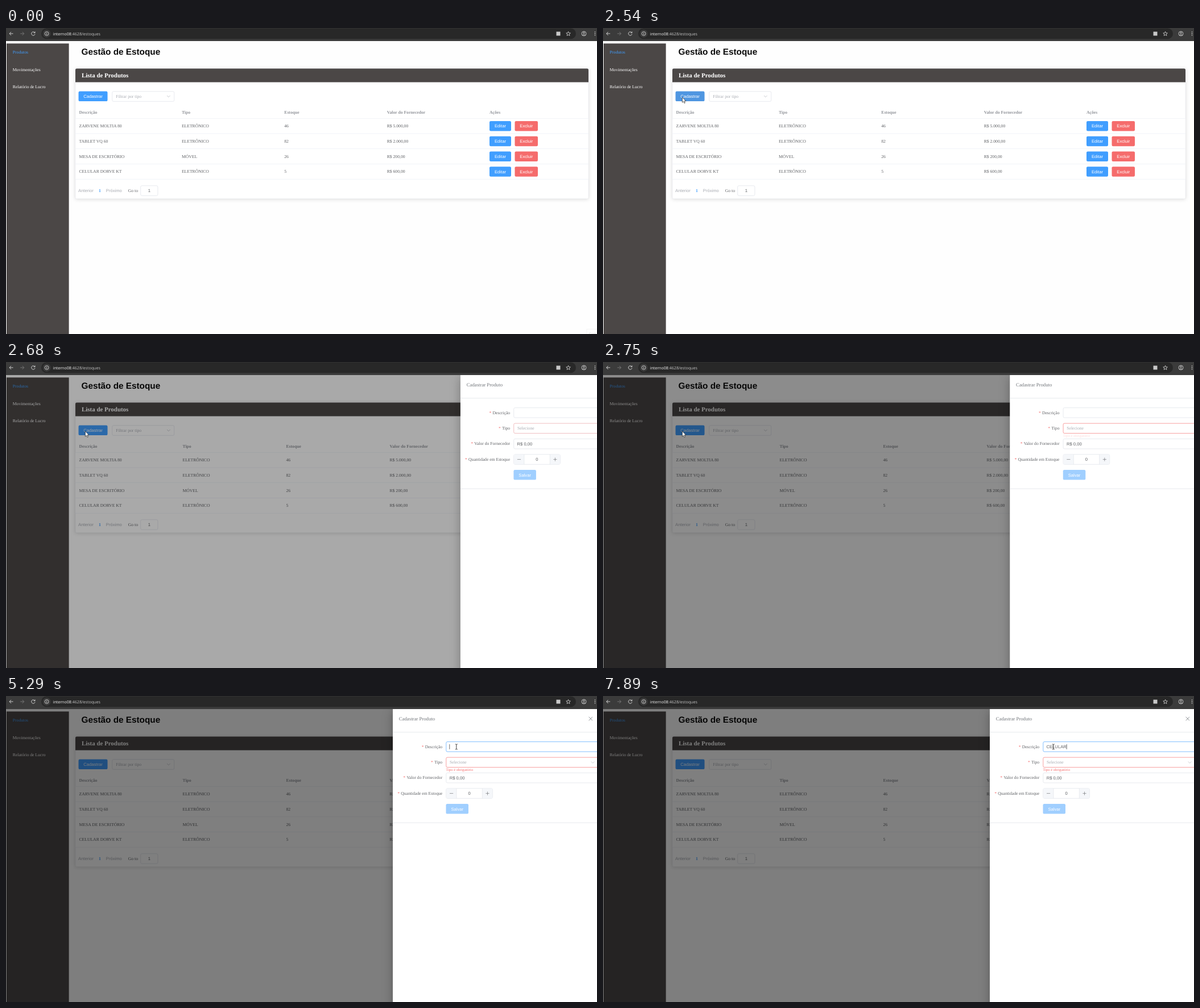
An HTML page for the animation above (8000 ms loop, 1039 by 539 pixels).

```html
<!DOCTYPE html>
<html lang="pt">
<head>
<meta charset="utf-8">
<title>Gestão de Estoque</title>
<style>
  html, body { margin: 0; width: 100%; height: 100%; overflow: hidden; background: #fefefe; }
  svg { display: block; width: 100%; height: 100%; }
  text { font-size: 7.65px; text-rendering: geometricPrecision; white-space: pre; }
  .serif { font-family: "Liberation Serif", "Times New Roman", serif; }
  .sans { font-family: "Liberation Sans", Arial, sans-serif; }
  .url { font-family: "Open Sans", "Noto Sans", sans-serif; font-size: 7.1px; }
  .bold { font-weight: bold; }
  .mid { text-anchor: middle; }
  .end { text-anchor: end; }
  .card { filter: drop-shadow(0 1px 3.3px rgba(0,0,0,.14)); }
  .panel { filter: drop-shadow(0 4px 9px rgba(0,0,0,.28)); }
</style>
</head>
<body>
<svg id="stage" viewBox="0 0 1039 539" preserveAspectRatio="none"></svg>
<script>
const BLUE = '#409eff', RED = '#f56c6c', INK = '#606266', MUTED = '#a8abb2';
const DARK = '#4b4746', BORDER = '#dcdfe6', LINE = '#ebeef5';
const stage = document.getElementById('stage');

function add(parent, tag, attrs = {}, content) {
  const el = document.createElementNS('http://www.w3.org/2000/svg', tag);
  for (const key in attrs) el.setAttribute(key, attrs[key]);
  if (content !== undefined) el.textContent = content;
  parent.append(el);
  return el;
}
const group = parent => add(parent, 'g');
const rect = (p, x, y, width, height, fill, more) => add(p, 'rect', { x, y, width, height, fill, ...more });
const path = (p, d, stroke, width = .6, more) =>
  add(p, 'path', { d, fill: 'none', stroke, 'stroke-width': width, ...more });
const text = (p, x, y, str, fill, cls = 'serif', size) => {
  const el = add(p, 'text', { x, y, fill, class: cls }, str);
  if (size) el.style.fontSize = size + 'px';
  return el;
};
const field = (p, x, y, w) => rect(p, x, y, w, 17.5, '#fff', { rx: 2.2, stroke: BORDER, 'stroke-width': .65 });
const chevron = (p, x, y) => path(p, `M${x - 2.8} ${y - 1.4}l2.8 2.8 2.8-2.8`, MUTED);
function button(p, x, y, w, label, fill) {
  const box = rect(p, x, y, w, 17.5, fill, { rx: 2.2 });
  text(p, x + w / 2, y + 11.5, label, '#fff', 'sans mid');
  return box;
}
const move = (el, x, y) => el.setAttribute('transform', `translate(${x} ${y})`);
const show = (el, on) => el.setAttribute('visibility', on ? 'visible' : 'hidden');

// Page
const page = group(stage);
rect(page, 0, 0, 1039, 539, '#fefefe');
rect(page, 1, 27.3, 109.6, 512, DARK);
['Produtos', 'Movimentações', 'Relatório de Lucro'].forEach((label, i) =>
  text(page, 11.8, 45 + i * 30.6, label, i ? '#fff' : BLUE));
text(page, 132.6, 46.7, 'Gestão de Estoque', '#0b0b0b', 'sans bold', 15.3);

rect(page, 122, 71.5, 902, 229.2, '#fff', { rx: 2.2, stroke: '#e4e7ed', 'stroke-width': .5, class: 'card' });
path(page, 'M122 95.4V73.7a2.2 2.2 0 0 1 2.2-2.2H1021.8a2.2 2.2 0 0 1 2.2 2.2V95.4z', 'none', 0, { fill: DARK });
text(page, 133, 87.3, 'Lista de Produtos', '#fff', 'serif bold', 10.93);

const register = button(page, 127.5, 111.6, 51, 'Cadastrar', BLUE);
field(page, 186.7, 111.8, 109);
text(page, 193.2, 123, 'Filtrar por tipo', MUTED);
chevron(page, 285.8, 120.4);

const ROW_TOP = 159.2, ROW_H = 26.75;
const heads = ['Descrição', 'Tipo', 'Estoque', 'Valor do Fornecedor', 'Ações'];
const items = [
  ['ZARVENE MOLTIA 80', 'ELETRÔNICO', '46', 'R$ 5.000,00'],
  ['TABLET VQ 60', 'ELETRÔNICO', '82', 'R$ 2.000,00'],
  ['MESA DE ESCRITÓRIO', 'MÓVEL', '26', 'R$ 200,00'],
  ['CELULAR DORVE KT', 'ELETRÔNICO', '5', 'R$ 600,00']
];
const rows = items.map((_, i) => rect(page, 122.3, ROW_TOP + i * ROW_H, 901.4, ROW_H, '#fff'));
for (let i = 0; i <= 4; i++) rect(page, 122.3, ROW_TOP - .3 + i * ROW_H, 901.4, .7, LINE);

const columns = heads.map((head, c) => {
  const col = group(page), x = 128.5 + c * 180.4;
  text(col, x, 150.6, head, '#909399', 'serif bold');
  items.forEach((item, r) => {
    const y = ROW_TOP + r * ROW_H;
    if (c < 4) return text(col, x, y + 15.8, item[c], INK);
    button(col, 850, y + 4.7, 38, 'Editar', BLUE);
    button(col, 894.5, y + 4.7, 40.5, 'Excluir', RED);
  });
  return col;
});

text(page, 127, 289.2, 'Anterior', MUTED, 'sans');
text(page, 164.8, 289, '1', BLUE, 'serif bold mid');
text(page, 175.8, 289.2, 'Próximo', MUTED, 'sans');
text(page, 214.8, 289, 'Go to', INK);
field(page, 236.7, 277.8, 30.2);
text(page, 251.8, 289.3, '1', INK, 'sans mid');

const hint = group(page);
rect(hint, 1021, 530.5, 20, 10, '#fff', { stroke: '#eeeeee', 'stroke-width': .6 });
text(hint, 1024.5, 541, 'Com', '#d8d8d8', 'sans', 6.5);

const shade = rect(stage, 0, 23, 1039, 516, '#000');

// Drawer, laid out at its open position
const drawer = group(stage);
rect(drawer, 680, 23, 369, 530, '#fff', { class: 'panel' });
text(drawer, 690.8, 43, 'Cadastrar Produto', '#72767b', 'serif', 8.74);
path(drawer, 'M1024.6 36.8l6.4 6.4m0-6.4l-6.4 6.4', '#72767b', .8);
rect(drawer, 680, 63.5, 369, .7, BORDER);
rect(drawer, 680, 222.8, 369, .7, BORDER);
['Descrição', 'Tipo', 'Valor do Fornecedor', 'Quantidade em Estoque'].forEach((label, i) => {
  const el = text(drawer, 767.2, 91.6 + i * 27.4, '', INK, 'serif end');
  add(el, 'tspan', { fill: RED }, '*');
  add(el, 'tspan', { dx: 2.2 }, label);
});
const [nameField, typeField] = [80.6, 108.1, 135.4].map(y => field(drawer, 773.8, y, 268));
text(drawer, 780, 119.2, 'Selecione', MUTED);
chevron(drawer, 1031.6, 116.9);
const error = text(drawer, 773.5, 132.1, 'Tipo é obrigatório', RED, 'serif', 6.55);
text(drawer, 779.7, 146.9, 'R$ 0,00', INK, 'sans');
field(drawer, 773.8, 162.8, 81.6);
rect(drawer, 774.2, 163.2, 17.6, 16.7, '#f5f7fa');
rect(drawer, 837.6, 163.2, 17.5, 16.7, '#f5f7fa');
path(drawer, 'M792 163v17.2M837.4 163v17.2', BORDER);
path(drawer, 'M780 171.6h6.2M843.4 171.6h6.2m-3.1-3.1v6.2', INK);
text(drawer, 814.5, 174.3, '0', INK, 'sans mid');
button(drawer, 773.5, 190.1, 39.5, 'Salvar', '#a0cfff');
const typed = text(drawer, 779.5, 92.2, '', INK, 'sans');
const caret = rect(drawer, 779.5, 85, .7, 8.8, '#303133');

// Browser bar
const bar = group(stage);
rect(bar, 0, 0, 1039, 23, '#3b3b3b');
rect(bar, 62, .6, 940, 18.6, '#282828', { rx: 9.3 });
path(bar, 'M12.5 9.9H6m3-3l-3 3 3 3', '#dedede', .9);
path(bar, 'M25.2 9.9h6.5m-3-3l3 3-3 3', '#7b7b7b', .9);
path(bar, 'M50.6 8.2A3.2 3.2 0 1 0 51 10.7M51 6.3v2.3h-2.4', '#dedede', .9);
add(bar, 'circle', { cx: 71.6, cy: 9.9, r: 7, fill: '#3b3b3b' });
add(bar, 'circle', { cx: 71.6, cy: 9.9, r: 3.4, fill: 'none', stroke: '#e6e6e6', 'stroke-width': .8 });
path(bar, 'M71.6 9.5v2.3m0-3.9v.9', '#e6e6e6', .9);
const url = text(bar, 82.6, 12.5, '', '#f4f4f4', 'url');
add(url, 'tspan', {}, 'interno08');
add(url, 'tspan', { fill: '#c4c4c4' }, ':4628/estoques');
rect(bar, 967.5, 6.5, 7, 7, '#c8c8c8');
const star = Array.from({ length: 10 }, (_, i) => {
  const a = i * Math.PI / 5, r = i % 2 ? 1.8 : 4;
  return [988.6 + r * Math.sin(a), 10.2 - r * Math.cos(a)].map(v => v.toFixed(2));
});
path(bar, `M${star.join('L')}z`, '#dedede', .8);
add(bar, 'circle', { cx: 1016, cy: 9.9, r: 4, fill: 'none', stroke: '#dedede', 'stroke-width': .8 });
add(bar, 'circle', { cx: 1016, cy: 8.7, r: 1.3, fill: 'none', stroke: '#dedede', 'stroke-width': .8 });
path(bar, 'M1013.4 12.6q2.6-2 5.2 0', '#dedede', .8);
for (const cy of [7, 9.9, 12.8]) add(bar, 'circle', { cx: 1035.5, cy, r: .8, fill: '#dedede' });

// Pointers
const arrow = path(stage, 'M0 0V9.2L2.1 7.2 3.6 10.5 5.1 9.8 3.7 6.6H6.6z', '#111', .65, { fill: '#fff' });
const beam = path(stage, 'M-2-4.6Q0-4.6 0-3.8Q0-4.6 2-4.6M0-3.8V3.8M-2 4.6Q0 4.6 0 3.8Q0 4.6 2 4.6', '#111', .8);

// Timeline
const LOOP = 8000, OPEN = 2561, FOCUS = 4220;
const pointerKeys = [
  [530, 994, 527], [740, 860, 462], [1020, 590, 338], [1300, 409, 251], [1580, 275, 190],
  [1860, 165, 138], [2070, 138, 125], [2140, 138, 124], [2280, 139.3, 122],
  [2890, 139.3, 122], [2960, 160, 123], [3030, 215, 127], [3100, 300, 132], [3170, 400, 136],
  [3240, 501, 139], [3310, 605, 140], [3380, 689, 136], [3450, 742, 118], [3520, 772, 102],
  [3660, 788, 92], [3870, 791.8, 89.4]
];
const typing = [5820, 6230, 6360, 6830, 7360, 7490, 7890];
const clamp = v => Math.min(1, Math.max(0, v));
const ramp = (t, start, length) => clamp((t - start) / length);
const mix = (a, b, k) => `color-mix(in srgb, ${b} ${k * 100}%, ${a})`;

// CSS "ease": cubic-bezier(.25, .1, .25, 1)
function ease(x) {
  let lo = 0, hi = 1;
  for (let i = 0; i < 20; i++) {
    const s = (lo + hi) / 2;
    if (.75 * s * (1 - s) + s ** 3 < x) lo = s; else hi = s;
  }
  return .3 * lo * (1 - lo) ** 2 + 3 * lo * lo * (1 - lo) + lo ** 3;
}

function pointerAt(t) {
  const next = pointerKeys.findIndex(key => key[0] > t);
  if (next < 0) return pointerKeys.at(-1).slice(1);
  if (next === 0) return [1060, 560];
  const [t0, x0, y0] = pointerKeys[next - 1], [t1, x1, y1] = pointerKeys[next];
  const k = (t - t0) / (t1 - t0);
  return [x0 + (x1 - x0) * k, y0 + (y1 - y0) * k];
}

function render(time) {
  // The screen refreshes every 70 ms
  const base = time < 2470 ? 530 : 2470;
  const t = base + Math.floor((time - base) / 70) * 70;

  show(hint, time < 70);
  const [x, y] = pointerAt(t);
  const locked = t >= OPEN;
  const inField = x > 773 && y > 80 && y < 98;
  move(arrow, x, y);
  move(beam, x, y);
  show(arrow, !inField);
  show(beam, inField);

  const hovered = locked || x > 1024 ? -1 : Math.floor((y - ROW_TOP) / ROW_H);
  rows.forEach((row, i) => row.setAttribute('fill', i === hovered ? '#f5f7fa' : '#fff'));
  const overButton = x > 127 && x < 178 && y > 111 && y < 129;
  register.style.fill = locked || !overButton ? BLUE : t >= 2470 ? '#4f96e1' : '#79bbff';

  const k = ease(ramp(t, OPEN, 300));
  columns.forEach((col, i) => move(col, locked ? i * 1.6 : 0, 0));
  shade.setAttribute('opacity', k / 2);
  show(drawer, locked);
  move(drawer, (1 - k) * 369, 0);
  typeField.style.stroke = mix(BORDER, RED, ramp(t, 2600, 140));
  error.setAttribute('opacity', ramp(t, 2690, 260));

  nameField.style.stroke = mix(BORDER, BLUE, clamp(Math.floor((time - FOCUS) / 70 + 1) / 3));
  typed.textContent = 'CELULAR'.slice(0, typing.filter(at => time >= at).length);
  caret.setAttribute('x', 779.5 + (typed.textContent ? typed.getComputedTextLength() : 0));
  show(caret, time >= FOCUS && !(time >= 4760 && time < 5290));
}

const begin = performance.now();
function tick() {
  render((performance.now() - begin) % LOOP);
  requestAnimationFrame(tick);
}
tick();
</script>
</body>
</html>
```
